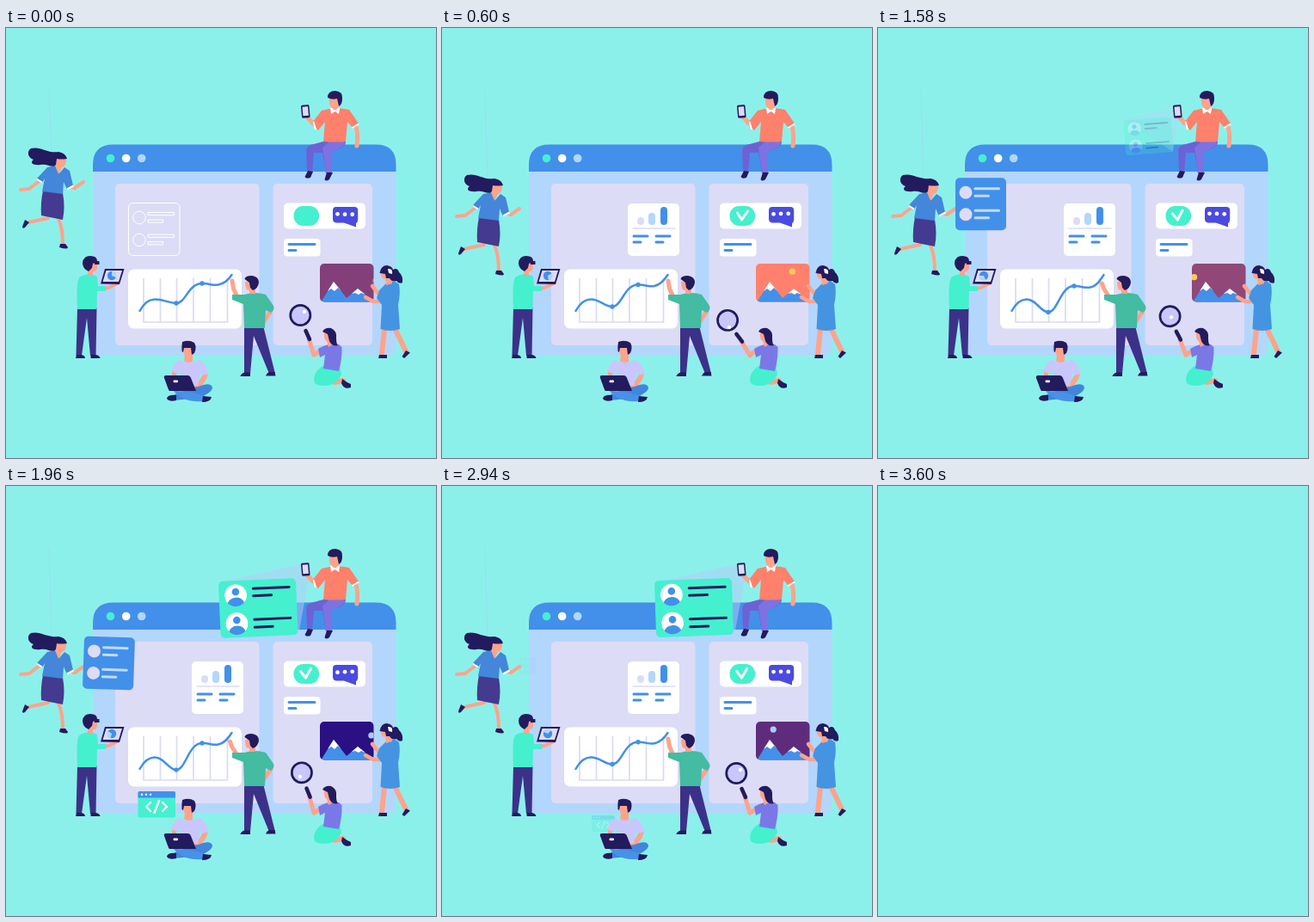
An HTML page for the animation above (3.62 s loop, 500x500 px).

```html
<!DOCTYPE html>
<html lang="en">
<head>
<meta charset="utf-8">
<style>
html, body { margin: 0; height: 100%; overflow: hidden; background: #8cf0ea; }
svg { display: block; width: 100vw; height: 100vh; }
.ink { fill: #221b5e } .skin { fill: #ffa38b } .blue { fill: #4290ea } .sky { fill: #b3d6fd }
.mint { fill: #45f0cf } .lilac { fill: #dcdcf6 } .white { fill: #fff } .indigo { fill: #443a8f }
.limb, .line { fill: none; stroke-linecap: round; stroke-linejoin: round }
.limb { stroke: #ffa38b; stroke-width: 5 }
.line { stroke: #4290ea; stroke-width: 3 }
.cuff { fill: none; stroke: #fff; stroke-width: 2 }
</style>
</head>
<body>
<svg viewBox="0 0 500 500">
<defs>
  <clipPath id="frame"><rect x="365" y="274" width="62.5" height="44.5" rx="5"/></clipPath>
  <clipPath id="disc"><circle r="13"/></clipPath>
  <g id="avatar" clip-path="url(#disc)">
    <circle r="13" class="white"/><circle cy="-4" r="4.3" class="blue"/><ellipse cy="11" rx="10" ry="8.5" class="blue"/>
  </g>
</defs>
<g id="scene">
  <!-- browser window -->
  <path class="sky" d="M101 160H453.500V371Q453.500 381 443 381H111Q101 381 101 371Z"/>
  <path class="blue" d="M101 167V159Q101 135.500 125 135.500H430Q453.500 135.500 453.500 159V167Z"/>
  <circle cx="121.500" cy="151.500" r="4.800" class="mint"/>
  <circle cx="139.700" cy="151.500" r="4.800" class="white"/>
  <circle cx="157.700" cy="151.500" r="4.800" class="sky"/>
  <rect x="127" y="181" width="167.500" height="188" rx="5" class="lilac"/>
  <rect x="310.500" y="181" width="115.500" height="188" rx="5" class="lilac"/>

  <g id="wire" fill="none" stroke="#fff">
    <rect x="142.500" y="203.500" width="59.500" height="61" rx="5"/>
    <circle cx="155" cy="220.500" r="7.300"/><circle cx="155" cy="246.500" r="7.300"/>
    <path d="M165 214.500h30.500v3.200H165zM165 223h17.500v3.200H165zM165 240.200h30.500v3.200H165zM165 248.700h17.500v3.200H165z"/>
  </g>

  <g id="stats">
    <rect x="216" y="204" width="60" height="61" rx="5" class="white"/>
    <g id="bars">
      <rect x="227" y="220" width="8" height="9" rx="4" class="lilac"/>
      <rect x="240" y="215" width="8" height="14" rx="4" class="sky"/>
      <rect x="254" y="208" width="8" height="21" rx="4" class="blue"/>
    </g>
    <path class="line" style="stroke:#dcdcf6;stroke-width:1.500" d="M222 233H271"/>
    <path class="line" d="M223 242h16M249 242h16M223 249h8M249 249h8"/>
  </g>

  <rect x="142" y="280.500" width="132" height="69" rx="7" class="white"/>
  <path fill="none" stroke="#dadaf3" stroke-width="1.700" d="M160 291V342H257.500V291M179.500 291V342M198.500 291V342M218 291V342M237.500 291V342"/>
  <path id="curve" class="line" style="stroke-width:2.500"/>
  <circle id="low" cx="198" r="2.700" class="blue"/><circle id="high" cx="228" r="2.700" class="blue"/>

  <rect x="323" y="203.500" width="95" height="30" rx="5" class="white"/>
  <rect x="334.500" y="207" width="29.500" height="23" rx="11" class="mint"/>
  <path id="tick" class="line" style="stroke:#fff" d="M-6 -3L-1 5L6 -5"/>
  <path fill="#4a4be0" d="M384 208H405Q409.200 208 409.200 212V223Q409 226 407 227V231.500L393 226.500H384Q380 226 380 222V212Q380 208 384 208Z"/>
  <g class="white"><circle class="dot" cx="385.500" r="2.400"/><circle class="dot" cx="394" r="2.400"/><circle class="dot" cx="402.700" r="2.400"/></g>
  <rect x="323" y="245" width="42.500" height="20.500" rx="4" class="white"/>
  <path class="line" d="M329 251.500H359M329 258.500H337"/>

  <g clip-path="url(#frame)">
    <rect id="dusk" x="365" y="274" width="63" height="45"/>
    <circle id="orb" r="3.600"/>
    <path class="blue" d="M366 319L381 295L396 314L409 303L428 319Z"/>
    <path class="white" d="M381 295L374 306L378 303L382 306L386 302L390 306ZM409 303L402 309L406 308L410 310L413 308L418 310Z"/>
  </g>

  <!-- phone holder on the window -->
  <path id="beam" fill="#b8ccfa" d="M346 90L353 104L340 173L247 112Z"/>
  <g id="green">
    <rect x="-45" y="-33" width="90" height="66" rx="5" class="mint"/>
    <use href="#avatar" x="-25.500" y="-16"/><use href="#avatar" x="-25.500" y="17"/>
    <path class="line" style="stroke:#221b5e" d="M-5 -23H37M-5 -14.500H16M-5 13H37M-5 22H16"/>
  </g>
  <path class="limb" d="M362 115L356 110L348 101M406 112Q410 121 408 137"/>
  <path fill="#6d62d5" d="M369 132L395 131Q396 140 379 143L379 168L372 169L368 145L358 145L356 168L350 166L349 142Q350 136 358 135Z"/>
  <path fill="#7d72e2" d="M395 131Q394 140 379 143L379 168L372 169L368 139L376 132Z"/>
  <path class="ink" d="M351 166L357 167L354 174Q349 176 347.500 173ZM373 168L380 168L376 176Q372 179 370.500 176Z"/>
  <path fill="#ff806b" d="M367 96Q383 91 399 95L410 111L403 116L397 109L395 132Q382 133 369 132L371 109L363 119L356 110Z"/>
  <path class="cuff" d="M357.500 109L360 118M402.500 116L410 111.500"/>
  <path class="white" d="M377 93L388 93L387 100L382.500 97L378 100Z"/>
  <path class="skin" d="M376 81H388V90Q383 99 379 93Q375 90 376 81Z"/>
  <path class="ink" d="M374 81Q374 73 383 73Q392 74 391 82Q391 89 387 91L385 82Q379 84 374 81Z"/>
  <g transform="rotate(-5 348 97)"><rect x="343.500" y="89.500" width="9.500" height="15" rx="1.500" class="ink"/><rect x="345" y="91.500" width="6.500" height="10.500" class="lilac"/></g>

  <!-- woman on the rope -->
  <g id="girl">
    <path id="rope" stroke="#a9c6f8" opacity=".45"/>
    <path class="limb" style="stroke-width:4" d="M40 208L27 218L17 219M76 216L80 217L90 210M49 252L26 257M61 253Q66 263 66 283"/>
    <path class="ink" d="M22 254L27 257L22 263Q19 265 19 262ZM63 282L69 282L72 286Q72 289 62 286Z"/>
    <path class="indigo" d="M43 220L66 223Q69 239 66 254L41 249Q40 234 43 220Z"/>
    <path fill="#4386da" d="M48 193L58 191L62 200L68 193L74 197L78 214L71 219L67 210L66 224L42 221L45 206L42 211L35 207Z"/>
    <path class="cuff" d="M35.500 206.500L42 210.500M71 218.500L78.500 214.500"/>
    <path class="skin" d="M58 180L70 182Q71 191 65 193L61 201L57 191Z"/>
    <path class="ink" d="M71 183Q69 176 61 175C48 177 40 168 29 171C24 174 25 182 32 184C27 188 32 191 40 190C48 188 54 195 58 190L59 183Q64 184 71 183Z"/>
  </g>
  <g id="contact">
    <rect x="-29.500" y="-30.500" width="59" height="61" rx="5" class="blue"/>
    <circle cx="-17.500" cy="-13.500" r="7.500" class="lilac"/><circle cx="-17.500" cy="12" r="7.500" class="lilac"/>
    <path class="line" style="stroke:#c3dcfc" d="M-6.500 -18H21M-6.500 -9.500H9M-6.500 7.500H21M-6.500 16H9"/>
  </g>

  <!-- man presenting a laptop -->
  <path fill="#3c3189" d="M83 325H105.500L104.500 381H98L94 337L88 381H81.500Z"/>
  <path class="ink" d="M82 380H88Q92 381 92 384H81ZM98.500 380H105Q109 381 109.500 384H98.500Z"/>
  <path class="limb" style="stroke-width:4" d="M111 303L119 302L130 297"/>
  <path class="mint" d="M85 290Q96 283 106 289L107 300L116 300V306L106 306L105.500 327H83Q82 308 83 296Z"/>
  <path class="skin" d="M96 272H106L106 279Q105 284 101 283L101 288H95Z"/>
  <path class="ink" d="M89 273Q90 265 98 265Q106 265 106 271L101 274L100 279L96 283Q89 280 89 273ZM102 271H108.500V275H103Z"/>
  <path class="ink" d="M115 280H137.500L132 298L110 297.500Z"/><path class="lilac" d="M116.500 282H135L131 295H112.500Z"/>
  <circle cx="123" cy="288" r="5.200" class="blue"/><path id="slice" class="sky" d="M0 0V-5.500A5.500 5.500 0 0 1 5 2Z"/>

  <!-- seated coder -->
  <g id="code">
    <rect x="153.500" y="355" width="43.500" height="30.500" rx="2" class="mint"/>
    <path class="blue" d="M153.500 362.500V357Q153.500 355 155.500 355H195Q197 355 197 357V362.500Z"/>
    <g class="white"><circle cx="158" cy="358.700" r="1.200"/><circle cx="163" cy="358.700" r="1.200"/><circle cx="168" cy="358.700" r="1.200"/></g>
    <path class="line" style="stroke:#fff;stroke-width:2.300" d="M168 368L163 373L168 378M178 366L172.500 380M182 368L187 373L182 378"/>
  </g>
  <path class="skin" d="M208 381H217L217 388L212 390L207 387ZM229 402L235 402Q233 412 224 419L216 417Q225 413 229 402ZM193 398L199 401L197 406H193Z"/>
  <path fill="#3f86dc" d="M198 421L224 417Q238 411 240 418Q240 424 224 430L196 433L196 426L207 423Z"/>
  <path fill="#4792e6" d="M198 422Q215 422 232 428L230 434Q206 436 195 422Z"/>
  <path class="ink" d="M198 427V433Q190 435 187 431Q188 426 198 427ZM229 428L239 429Q238 435 228 435Z"/>
  <path fill="#c9c6fb" d="M201 386Q212 392 225 386Q231 388 236 402L228 404L226 399L223 416H204L203 398L199 402L192 399Q195 390 201 386Z"/>
  <path class="skin" d="M206 370H218V379Q213 387 208 381Q206 378 206 370Z"/>
  <path class="ink" d="M204.500 376Q204 370 205 365Q213 362 219 366Q222 371 219 378L216 380L215 372H207L206 377Z"/>
  <path class="ink" d="M186 404H211Q214 404 215 407L221 422H190Q189 421 188 418L184 407Q183 404 186 404Z"/>
  <rect x="194.500" y="409.500" width="5.500" height="2.800" rx="1.200" class="white"/>

  <!-- man at the chart -->
  <path id="point" class="limb"/>
  <path fill="#3c3189" d="M277 348H299.500L313 402H306L288 358L284 402H277Z"/>
  <path class="ink" d="M277.500 400.500H284V405H272.500Q273 402 277.500 400.500ZM306 400H312.500L313.500 404.500H302Q303 401 306 400Z"/>
  <path class="limb" d="M308 329L300 341"/>
  <path fill="#43bca1" d="M263 310L277 310Q290 306 302 310L311 323Q313 327 308 331L302 328L301 349H277L276 321L263 316Z"/>
  <path class="skin" d="M278 295H290V309H283V305Q278 306 278 295Z"/>
  <path class="ink" d="M277.500 292Q278 288 286 288Q294 289 294 296Q293 303 287 305L284 302L283 296Z"/>

  <!-- kneeling woman -->
  <path class="limb" style="stroke-width:6" d="M382 412L392 410"/>
  <path class="ink" d="M391 408Q396 412 401 414V418Q393 421 390 413Z"/>
  <path class="mint" d="M368 393Q358 400 358 409Q358 416 368 416Q383 417 390 403L388 393Z"/>
  <path class="limb" d="M368 374L358 380"/>
  <g id="lens">
    <path class="limb" d="M358 380L352 361"/>
    <path class="line" style="stroke:#221b5e;stroke-width:4.500" d="M348.500 352L353 362"/>
    <circle cx="342.300" cy="334" r="11.600" fill="#c9c6fb" stroke="#221b5e" stroke-width="2.700"/>
  </g>
  <circle id="glint" r="2.200" class="white"/>
  <path fill="#7a78e6" d="M363 373Q375 366 387 368L390.500 371Q391 385 387 399L369 396L371 380L365 383Z"/>
  <path class="skin" d="M370 352H380V368L375 371L373 364Q369 363 370 352Z"/>
  <path class="ink" d="M368 353Q371 348 378 349Q385 352 384 361Q384 367 386 369Q379 371 376 364L374 356Z"/>

  <!-- woman at the picture -->
  <path class="limb" style="stroke-width:6" d="M440 350L437 379M452 349L465 376"/>
  <path class="ink" d="M434 380H443V384H433ZM465 375L470 377.500L463 384L460.500 382Z"/>
  <path class="limb" style="stroke-width:4.500" d="M433 309L426 300M440 318L427 318L418 313"/>
  <path fill="#4594e2" d="M442 297Q451 292 457 298Q459 308 456 322L458 350Q447 354 435.500 350L437 322L431 314L434 305Z"/>
  <path class="skin" d="M436 284H447L449 297L442 299L441 292Q435 292 436 284Z"/>
  <path class="ink" d="M434.500 285Q436 276 443 276Q449 277 450 281Q455 278 457 284Q462 288 461 296Q457 298 454 294Q449 296 446 291L442 291L441 286Z"/>
  <path class="white" d="M444 280Q450 279 449 286L445 285Z"/>
</g>
</svg>
<script>
const LOOP = 3620, BLANK = 3600;
const $ = id => document.getElementById(id);
const set = (id, attrs) => { for (const k in attrs) $(id).setAttribute(k, attrs[k]); };

// Eased interpolation through [time, value] pairs
function key(t, ...points) {
  let [t0, v0] = points[0];
  for (const [t1, v1] of points) {
    if (t < t1) {
      const p = Math.max(0, (t - t0) / (t1 - t0));
      return v0 + (v1 - v0) * p * p * (3 - 2 * p);
    }
    [t0, v0] = [t1, v1];
  }
  return v0;
}
const visible = (t, a, b, c, d) => key(t, [a, 0], [b, 1], [c, 1], [d, 0]);
const mix = (a, b, p) => `rgb(${a.map((v, i) => Math.round(v + (b[i] - v) * p))})`;
const place = (x, y, angle = 0) => `translate(${x} ${y}) rotate(${angle})`;

// Grows a part out of the point (x, y)
function pop(id, s, x, y, inner = '') {
  set(id, { transform: `translate(${x} ${y}) scale(${s}) translate(${-x} ${-y}) ${inner}`, opacity: s ** 3 });
}

function draw(t) {
  $('scene').style.display = t < BLANK ? '' : 'none';

  set('wire', { opacity: key(t, [0, 1], [400, 0], [3000, 0], [3500, 1]) });
  pop('stats', visible(t, 100, 480, 3150, 3500), 246, 234);
  const grow = key(t, [250, 0], [600, 1]);
  set('bars', { transform: `translate(0 229) scale(1 ${grow}) translate(0 -229)` });

  const low = key(t, [0, 320], [600, 324], [1220, 328], [1800, 331.5], [2380, 324], [2940, 323.5], [LOOP, 320]);
  const high = key(t, [0, 297], [600, 298.5], [1220, 301], [1960, 299], [LOOP, 297]);
  set('curve', { d: `M155.500 329C161 319 167 315.500 173 315.500C184 315.500 189 ${low} 198 ${low}C209 ${low} 212 ${high} 228 ${high}C238 ${high} 240 ${high + 3} 247 ${high + 1.5}S258 294 262.500 287` });
  set('low', { cy: low });
  set('high', { cy: high });
  const reach = key(t, [600, 0], [1220, 1], [1960, 1], [2380, 0]);
  set('point', { d: `M269 313L${264.500 - 2 * reach} 303L${263 - 2.5 * reach} ${294 + 3 * reach}` });

  const tick = visible(t, 150, 500, 3150, 3450);
  const tilt = key(t, [600, 0], [1220, -10], [1960, -6], [2380, 0], [2940, -5]);
  set('tick', { transform: `${place(349.500 + tilt * .1, 218, tilt)} scale(${tick})`, opacity: tick });
  document.querySelectorAll('.dot').forEach((dot, i) =>
    dot.setAttribute('cy', 216.300 - .5 * Math.sin(t * Math.PI * 6 / LOOP - i)));

  // Sun and moon share one arc, half a loop each
  const day = key(t, [0, .42], [500, 1], [1300, 1], [1850, 0], [2380, 0], [2940, .25], [LOOP, .42]);
  const arc = .655 - .00075 * (t % (LOOP / 2));
  set('dusk', { fill: mix([42, 16, 130], [255, 129, 109], day) });
  set('orb', {
    cx: 396 + 56 * Math.sin(arc), cy: 338 - 56 * Math.cos(arc),
    fill: t < LOOP / 2 ? '#ffca5c' : '#a8cdfa'
  });

  const lift = key(t, [0, -31], [550, 0], [3050, 0], [LOOP, -31]);
  set('girl', { transform: place(0, lift) });
  set('rope', { d: `M50 ${71 - lift}L53 176` });
  pop('contact', visible(t, 750, 1100, 2780, 3040), 90, 211,
    place(119.500, key(t, [1220, 203.500], [1960, 206], [2380, 204.500]), key(t, [1220, -2], [1960, 2], [2380, 0])));

  const shown = visible(t, 1350, 1750, 3050, 3400);
  const sway = key(t, [1400, -5], [1960, -2.500], [2380, -4.700], [2940, -2]);
  pop('green', shown, 347, 97, place(292 - sway * .5, 139.500 - sway, sway));
  pop('beam', shown, 347, 97);
  set('beam', { opacity: .5 * shown });

  pop('code', visible(t, 1400, 1800, 2780, 3160), 207, 428);
  set('slice', { transform: place(123, 288, t * 360 / LOOP) });

  const turn = key(t, [0, 0], [600, -13.500], [1220, -8.500], [1960, 2], [2380, 0]);
  set('lens', { transform: `rotate(${turn} 362 380)` });
  set('glint', {
    cx: key(t, [0, 347], [600, 334], [1220, 340], [1960, 342], [2380, 347]),
    cy: key(t, [0, 330], [600, 348], [1220, 334.500], [1960, 338], [2380, 330])
  });
}

function tick() {
  draw(performance.now() % LOOP);
  requestAnimationFrame(tick);
}
tick();
</script>
</body>
</html>
```
